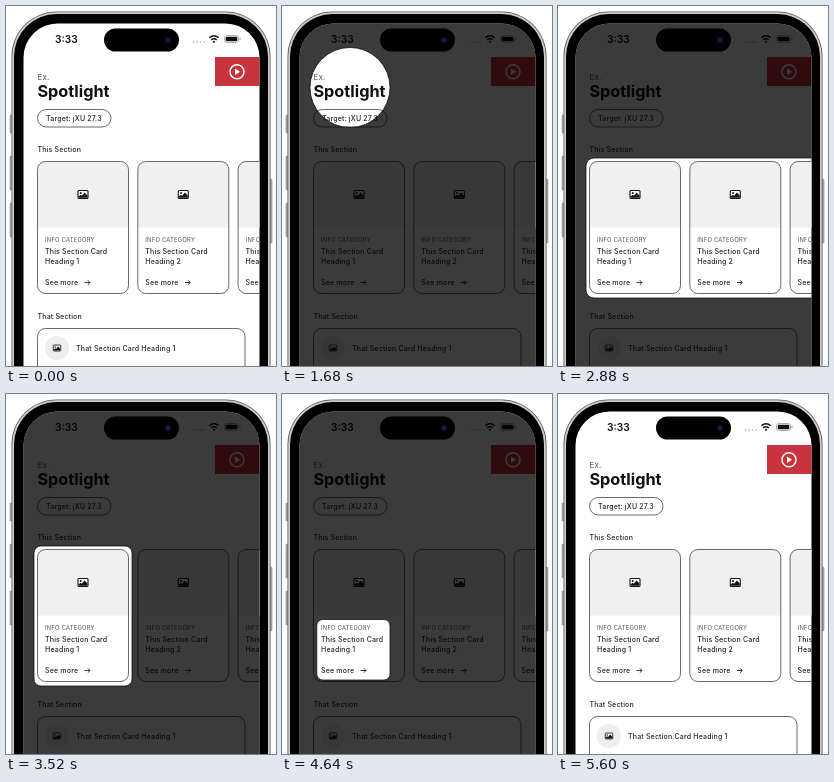
Animation, 270 px wide and 360 px high, one loop 5.76 s. Source, as an HTML page:

```html
<!DOCTYPE html>
<html lang="en">
<head>
<meta charset="utf-8">
<style>
  html, body { margin: 0; width: 100%; height: 100%; overflow: hidden; background: #fff; }
  svg { display: block; width: 270px; height: 360px; }
  text { font: 500 7px Inter, sans-serif; letter-spacing: .18px; fill: #222; }
  .title { font-weight: 700; font-size: 16.3px; letter-spacing: 0; fill: #111; }
  .clock { font-weight: 600; font-size: 10.2px; letter-spacing: 0; fill: #111; }
  .small { font-weight: 400; font-size: 5.8px; letter-spacing: .25px; fill: #555; }
  .lead { font-weight: 400; font-size: 8px; fill: #555; }
  .line { fill: none; stroke: #444; stroke-width: .8; }
  .thin { fill: none; stroke: #222; stroke-width: .9; }
</style>
</head>
<body>
<svg viewBox="0 0 270 360">
  <defs>
    <clipPath id="screen"><rect x="17.5" y="17.5" width="236" height="510" rx="34"/></clipPath>
    <clipPath id="cardTop"><rect x="31.5" y="155.5" width="91" height="132" rx="8"/></clipPath>
    <mask id="spot" maskUnits="userSpaceOnUse" x="0" y="0" width="270" height="360">
      <rect width="270" height="360" fill="#fff"/>
      <rect class="spot" fill="#000"/>
    </mask>
    <g id="picture">
      <rect x="-5" y="-4" width="10" height="8" rx="1" fill="#fff" stroke="#111" stroke-width="1.1"/>
      <circle cx="-2.3" cy="-1.5" r="1" fill="#111"/>
      <path d="M-4.4 3.2v-1.3l1.9-1.7 1.3 1.1 2.8-3.2 2.8 3v2.1z" fill="#111"/>
    </g>
    <g id="card">
      <rect x="31.5" y="155" width="91" height="66.5" fill="#f0f0f0" clip-path="url(#cardTop)"/>
      <rect class="line" x="31.5" y="155.5" width="91" height="132" rx="8"/>
      <use href="#picture" x="77" y="188.5"/>
      <text class="small" x="39" y="235.5">INFO CATEGORY</text>
      <text x="39" y="248">This Section Card</text>
      <text x="39" y="279">See more</text>
      <path class="thin" d="M78.5 276.5h5.5m-2.2-2.2 2.2 2.2-2.2 2.2"/>
    </g>
  </defs>

  <!-- phone body -->
  <g fill="#aaa" stroke="#777" stroke-width=".5">
    <rect x="4" y="109" width="3" height="18" rx="1"/>
    <rect x="4" y="150" width="3" height="34" rx="1"/>
    <rect x="4" y="197" width="3" height="34" rx="1"/>
    <rect x="263" y="173" width="3" height="64" rx="1"/>
  </g>
  <rect x="5.5" y="5.5" width="259" height="534" rx="45" fill="#555"/>
  <rect x="6.3" y="6.3" width="257.4" height="532.4" rx="44" fill="#cfcfd2"/>
  <rect x="8" y="8" width="254" height="529" rx="42.5"/>

  <g clip-path="url(#screen)">
    <rect width="270" height="360" fill="#fff"/>

    <!-- status bar -->
    <text class="clock" x="49" y="36.8">3:33</text>
    <path d="M187.5 36h12" stroke="#aaa" stroke-width="1.6" stroke-linecap="round" stroke-dasharray="0 3.5"/>
    <g fill="none" stroke="#111" stroke-width="1.5">
      <path d="M203.3 31.8q4.7-4 9.4 0M205.2 33.9q2.8-2.4 5.6 0"/>
      <circle cx="208" cy="35.8" r=".4"/>
    </g>
    <rect x="218.5" y="29.5" width="14" height="7" rx="2.2" fill="none" stroke="#999" stroke-width=".8"/>
    <rect x="219.7" y="30.7" width="11.6" height="4.6" rx="1.2" fill="#111"/>
    <path d="M234 31.8v2.4" stroke="#999"/>

    <!-- play button -->
    <rect x="209" y="51" width="45" height="29" fill="#c8343d"/>
    <circle cx="231" cy="65.7" r="7" fill="none" stroke="#fff" stroke-width="1.4"/>
    <path d="M229 62.4v6.6l5-3.3z" fill="#fff"/>

    <!-- page -->
    <text class="lead" x="31.5" y="74">Ex.</text>
    <text class="title" x="31.4" y="91.3">Spotlight</text>
    <rect class="line" x="31.5" y="103.5" width="73.5" height="17.5" rx="8.75"/>
    <text x="40" y="115">Target: jXU 27.3</text>
    <text x="31.5" y="146.2">This Section</text>
    <g id="cards"></g>
    <text x="31.5" y="313.2">That Section</text>
    <rect class="line" x="31.5" y="322.5" width="207.5" height="60" rx="8"/>
    <circle cx="51" cy="342" r="12" fill="#eee"/>
    <use href="#picture" transform="translate(51 342) scale(.75)"/>
    <text x="70" y="344.5">That Section Card Heading 1</text>

    <rect id="dim" width="270" height="360" mask="url(#spot)"/>
    <rect class="spot" fill="none" stroke="#000" stroke-opacity=".7"/>
  </g>

  <!-- camera island -->
  <rect x="98" y="22.5" width="75" height="23" rx="11.5"/>
  <circle cx="162" cy="34" r="3.6" fill="#0b0b1c"/>
  <circle cx="162" cy="34" r="1.6" fill="#23296b"/>
</svg>

<script>
  const LOOP = 5760, STEP = 80, MOVE = 350;
  const dim = document.getElementById('dim');
  const spots = document.querySelectorAll('rect.spot');

  document.getElementById('cards').innerHTML = [0, 1, 2].map(i =>
    `<g transform="translate(${i * 100.3})"><use href="#card"/>
     <text x="39" y="257.5">Heading ${i + 1}</text></g>`).join('');

  // spotlight states: left, top, right, bottom, corner radius, dim opacity
  const full = [-133, -3, 403, 533, 268, .62];
  const title = [28, 41.5, 108, 121.5, 40, .77];
  const row = [28, 152, 326, 292, 8, .77];
  const card = [28, 152, 126, 292, 7, .77];
  const info = [34.8, 225.5, 108, 286, 6, .77];
  const moves = [[676, title], [2112, row], [3060, card], [4000, info], [5040, full]];

  const ease = p => p * p * (3 - 2 * p);
  const clamp = p => Math.min(1, Math.max(0, p));

  function draw(now) {
    const t = Math.floor(now % LOOP / STEP) * STEP;
    const [l, top, r, b, radius, opacity] = moves.reduce((state, [start, to]) => {
      const p = ease(clamp((t - start) / MOVE));
      return state.map((v, i) => v + (to[i] - v) * p);
    }, full);
    const attrs = { x: l, y: top, width: r - l, height: b - top, rx: radius };
    for (const spot of spots)
      for (const name in attrs) spot.setAttribute(name, attrs[name]);
    dim.setAttribute('opacity', opacity);
    requestAnimationFrame(draw);
  }

  draw(0);
</script>
</body>
</html>
```
